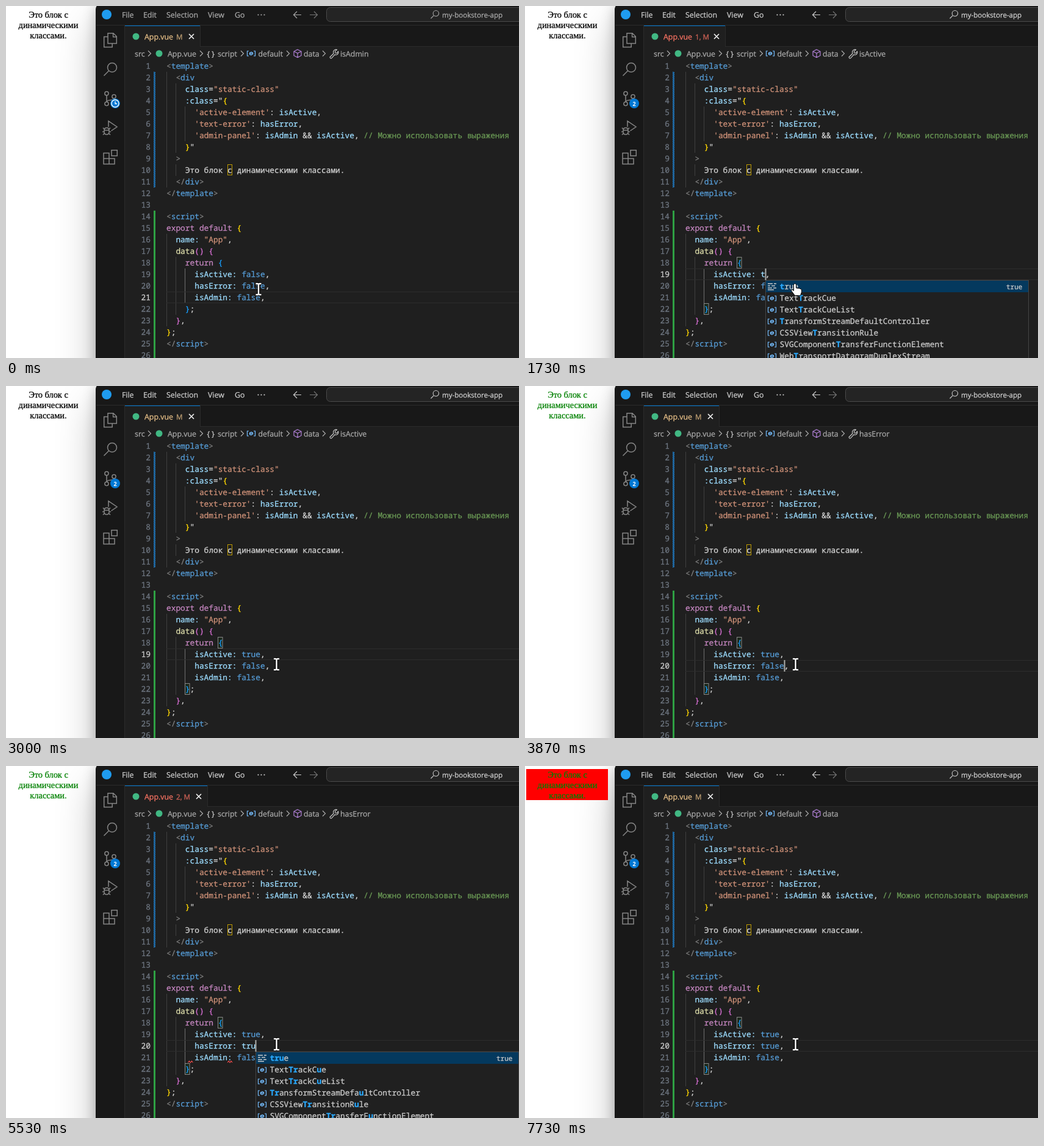
Recreate the animation shown at these times as an HTML page. Size 841 by 578 pixels, loop 8000 ms.

```html
<!DOCTYPE html>
<html lang="ru">
<head>
<meta charset="utf-8">
<title>Dynamic classes</title>
<style>
html, body { margin: 0; width: 100%; height: 100%; overflow: hidden; background: #fff; }
#scene { position: relative; width: 100%; height: 100%; overflow: clip; contain: strict; }
#window {
  position: absolute; left: 147px; right: -20px; top: -3px; bottom: -40px;
  background: #181818; border-radius: 8px 0 0 0;
  box-shadow: 0 32px 64px rgba(0, 0, 0, .26), 0 2px 21px rgba(0, 0, 0, .24);
}
svg { display: block; position: absolute; left: 0; top: 0; }
text {
  white-space: pre; text-rendering: geometricPrecision;
  fill: currentColor; stroke: currentColor; stroke-width: .28px;
}
.ui { font-family: "Open Sans", "Noto Sans", sans-serif; font-size: 12.35px; }
.mono { font-family: "Noto Sans Mono", "DejaVu Sans Mono", monospace; font-size: 12.83px; }
.page { font-family: "Liberation Serif", serif; font-size: 14.4px; text-anchor: middle; }
</style>
</head>
<body>
<div id="scene">
  <div id="window"></div>
  <svg id="stage" width="841" height="578" viewBox="0 0 841 578"></svg>
</div>
<script>
const LOOP = 8000, LEFT = 263, CHAR = 7.698, ROW = 19;
const colX = col => LEFT + col * CHAR;
const rowY = line => 89 + (line - 1) * ROW;

const COLORS = {
  g: '#808080', b: '#569cd6', a: '#9cdcfe', s: '#ce9178', w: '#d4d4d4', c: '#6a9955',
  k: '#c586c0', f: '#dcdcaa', y: '#ffd700', p: '#da70d6', u: '#179fff'
};

// Each line: indent, then "~"-separated runs that start with a colour key.
const codeLines = s => [
  [0, 'g<~btemplate~g>'],
  [2, 'g<~bdiv'],
  [4, 'aclass~w=~s"static-class"'],
  [4, 'a:class~w="~y{'],
  [6, "s'active-element'~w: ~aisActive~w,"],
  [6, "s'text-error'~w: ~ahasError~w,"],
  [6, "s'admin-panel'~w: ~aisAdmin~w && ~aisActive~w, ~c// Можно использовать выражения"],
  [4, 'y}~w"'],
  [2, 'g>'],
  [4, 'wЭто блок с динамическими классами.'],
  [2, 'g</~bdiv~g>'],
  [0, 'g</~btemplate~g>'],
  [0, 'w'],
  [0, 'g<~bscript~g>'],
  [0, 'kexport default ~y{'],
  [2, 'aname: ~s"App"~w,'],
  [2, 'fdata~p() {'],
  [4, 'kreturn ~u{'],
  [6, 'aisActive: ' + valueRun(s.active + ',')],
  [6, 'ahasError: ' + valueRun(s.error)],
  [6, 'aisAdmin: ' + valueRun('false,')],
  [4, 'u}~w;'],
  [2, 'p}~w,'],
  [0, 'y}~w;'],
  [0, 'g</~bscript~g>'],
  [0, 'w']
];

function valueRun(value) {
  const word = value.replace(',', '');
  const key = word === 'true' || word === 'false' ? 'b' : 'a';
  return `~${key}${word}~w${value.slice(word.length)}`;
}

// Column, first line, last line; the last guide is the active one.
const GUIDES = [[0, 2, 11], [2, 3, 8], [2, 10, 10], [4, 5, 7], [0, 16, 23], [2, 18, 22], [4, 19, 21]];
const SUGGESTIONS = [
  'true', 'TextTrackCue', 'TextTrackCueList', 'TransformStreamDefaultController',
  'CSSViewTransitionRule', 'SVGComponentTransferFunctionElement', 'WebTransportDatagramDuplexStream'
];

// Every step lists only what changes at that time.
const STEPS = [
  [0, { clock: true, focus: false, line: 21, col: 0, caret: false, mouse: [414, 465], active: 'false',
        error: 'false,', crumb: 'isAdmin', errors: 0, selected: false, bulb: false, popup: false,
        waves: [], ink: '#000', alarm: false }],
  [70, { mouse: [414, 461] }],
  [130, { clock: false, mouse: [413, 453] }],
  [200, { mouse: [412, 447] }],
  [270, { mouse: [412, 444] }],
  [530, { focus: true, line: 19, col: 19, caret: true }],
  [600, { selected: true, col: 21 }],
  [670, { crumb: 'isActive', mouse: [422, 448] }],
  [730, { mouse: [436, 455] }],
  [870, { mouse: [443.5, 457], bulb: true }],
  [1130, { caret: false }],
  [1530, { selected: false, bulb: false, active: 't', col: 17, caret: true }],
  [1600, { popup: true }],
  [1670, { errors: 1 }],
  [1930, { active: 'tr', col: 18 }],
  [2000, { active: 'tru', col: 19 }],
  [2070, { active: 'true', col: 20 }],
  [2130, { errors: 0 }],
  [2470, { popup: false }],
  [3000, { caret: false }],
  [3270, { ink: '#008000' }],
  [3530, { caret: true }],
  [3670, { line: 20 }],
  [3730, { col: 21 }],
  [3870, { crumb: 'hasError' }],
  [4070, { error: 'false' }],
  [4200, { crumb: '' }],
  [4330, { errors: 1, waves: [[6, 13]] }],
  [4730, { crumb: 'hasError' }],
  [4870, { error: 'fals', col: 20 }],
  [4930, { error: 'fal', col: 19 }],
  [5000, { error: 'fa', col: 18 }],
  [5070, { error: 'f', col: 17 }],
  [5130, { error: '', col: 16, clock: true }],
  [5200, { error: 't', col: 17, errors: 2, waves: [[4.6, 5.5], [13, 14], [20, 21]] }],
  [5330, { error: 'tr', col: 18, popup: true }],
  [5470, { error: 'tru', col: 19, clock: false }],
  [5600, { error: 'true', col: 20 }],
  [6000, { popup: false }],
  [6270, { errors: 1, waves: [[6, 13]] }],
  [6330, { error: 'true,', col: 21 }],
  [6600, { errors: 0, waves: [] }],
  [6670, { crumb: '' }],
  [6730, { caret: false }],
  [7270, { caret: true }],
  [7530, { alarm: true }],
  [7730, { caret: false }]
];
const states = STEPS.map((_, i) => Object.assign({}, ...STEPS.slice(0, i + 1).map(step => step[1])));

const esc = str => str.replace(/&/g, '&amp;').replace(/</g, '&lt;');
const text = (x, y, str, color, cls = 'ui', extra = '') =>
  `<text class="${cls}" x="${x}" y="${y}" color="${color}" ${extra}>${esc(str)}</text>`;
const rect = (x, y, w, h, fill, extra = '') =>
  `<rect x="${x}" y="${y}" width="${w}" height="${h}" fill="${fill}" ${extra}/>`;
const line = (d, stroke, width = 1) =>
  `<path d="${d}" fill="none" stroke="${stroke}" stroke-width="${width}"/>`;
const dot = (x, y, r, fill, extra = '') => `<circle cx="${x}" cy="${y}" r="${r}" fill="${fill}" ${extra}/>`;
const at = (x, y, content) => `<g transform="translate(${x} ${y})">${content}</g>`;

const lens = (x, y, k, color, width) => at(x, y,
  dot(3 * k, -3 * k, 7.5 * k, 'none', `stroke="${color}" stroke-width="${width}"`) +
  line(`M${-2.3 * k} ${2.3 * k}L${-10.5 * k} ${10.5 * k}`, color, width));
const variableIcon = (x, y) => at(x, y,
  line('M-4-4h-2.5v8h2.5M4-4h2.5v8h-2.5M-2.6 1.4v-2.2l2.8-1.6 2.4 1.2v2.2l-2.8 1.6zM-2.4-.6l2.4 1 2.4-1.4', '#75beff', 1.2));

function page(s) {
  const rows = ['Это блок с', 'динамическими', 'классами.'];
  return (s.alarm ? rect(2, 5, 134, 51, '#f00') : '') +
    rows.map((row, i) => text(69.5, 19 + 17 * i, row, s.ink, 'page')).join('');
}

function titleBar(s) {
  const color = s.focus ? '#cccccc' : '#a8a8a8';
  const menu = [[190, 'File'], [225, 'Edit'], [263, 'Selection'], [331, 'View'], [375, 'Go']];
  return dot(165, 14, 8, '#1f9cf0') +
    menu.map(([x, name]) => text(x, 19, name, color)).join('') +
    [413.5, 418.5, 423.5].map(x => dot(x, 14.5, 1.1, color)).join('') +
    line('M484 14.5h-12.5M477 9l-5.5 5.5 5.5 5.5', color, 1.2) +
    line('M498 14.5h12M505 9l5.5 5.5-5.5 5.5', '#777', 1.2) +
    rect(525.5, 2.5, 400, 23, '#242424', 'rx="6" stroke="#4a4a4a"') +
    lens(703, 14, .62, color, 1.1) +
    text(715, 19, 'my-bookstore-app', color, 'ui', 'style="font-size:11.55px"') +
    rect(148, 31, 693, 1, '#2b2b2b');
}

function activityBar(s) {
  const ink = '#868686', pen = d => line(d, ink, 1.5);
  const badge = s.clock
    ? dot(0, 0, 8, '#0078d4') + dot(0, 0, 6, 'none', 'stroke="#fff" stroke-width="1.4"') + line('M0-3.5v4h3', '#fff', 1.3)
    : dot(0, 0, 8, '#0078d4') + text(0, 3.5, '2', '#fff', 'ui', 'text-anchor="middle" style="font-size:9px;font-weight:600"');
  return rect(194, 32, 1, 546, '#2b2b2b') +
    at(171, 56, pen('M-4-11.3h9l5.3 5.3v11.5h-14.3zM4.6-11.3v6h5.7M-4-5.5h-6.3v17h13.5v-6')) +
    lens(171, 104, 1, ink, 1.5) +
    at(171, 152, pen('M-6-5v10M6 0c0 4-12 1-12 5.5') +
      [[-6, -8.3], [6, -3.3], [-6, 8.6]].map(([x, y]) => dot(x, y, 3.1, '#181818', `stroke="${ink}" stroke-width="1.5"`)).join('')) +
    at(179, 160, badge) +
    at(171, 200, pen('M-3-1.5v-9.5l14 9.5-9.5 6.5M-10 4.5q0-4.5 4-4.5t4 4.5v2q0 4.5-4 4.5t-4-4.5zM-10 4h8M-10 2l-2-2M-2 2l2-2M-10 6.5h-3M-2 6.5h3M-9.5 9l-2.5 2.5M-2.5 9l2.5 2.5')) +
    at(171, 248, pen('M-11-6.5h9v9h-9zM-11 2.5h9v9h-9zM-2 2.5h9v9h-9zM2-11.3h9.3v9.3h-9.3z'));
}

function tab(s) {
  const grow = [0, 10, 12][s.errors], right = 318 + grow, color = s.errors ? '#f97363' : '#e8c088';
  return rect(195, 32, 646, 546, '#1f1f1f') +
    rect(right, 32, 841 - right, 35, '#181818') +
    rect(right, 32, 1, 35, '#2b2b2b') + rect(right, 66, 841 - right, 1, '#2b2b2b') +
    rect(195, 32, right - 195, 1, '#0078d4') +
    dot(213, 50, 5.5, '#41b883') +
    text(227, 55, 'App.vue', color) +
    text(279, 54.5, s.errors ? s.errors + ', M' : 'M', color, 'ui', 'opacity=".8" style="font-size:11.6px"') +
    line(`M${300 + grow} 46l8 8m0-8l-8 8`, '#fff', 1.5);
}

function breadcrumbs(s) {
  const ink = '#a9a9a9';
  const names = [[211, 'src'], [265, 'App.vue'], [347, 'script'], [413.5, 'default'], [488, 'data']];
  const chevrons = [233, 318, 385, 460];
  let out = '';
  if (s.crumb) {
    names.push([548, s.crumb]);
    chevrons.push(519);
    out += line('M531 84l6-6q-1.5-4 2-6 2-1 3.5-.3l-3 3 .3 2.3 2.3.3 2.5-2.8q1 3-1.5 5-2 1.3-4 .3l-5.5 6q-2 .8-2.6-1.8z', '#ccc', 1.1);
  }
  return out + names.map(([x, name]) => text(x, 83, name, ink)).join('') +
    chevrons.map(x => line(`M${x} 73.5l4.5 4.5-4.5 4.5`, ink, 1.2)).join('') +
    dot(251, 78, 5.5, '#41b883') +
    text(329.5, 82.5, '{ }', '#ccc', 'ui', 'style="font-size:12px"') +
    variableIcon(402, 78) +
    line('M478 71.5l6 3v7l-6 3-6-3v-7zM472 74.5l6 3 6-3M478 77.5v7', '#b180d7', 1.2);
}

function gutter(s) {
  let out = rect(242, rowY(2), 3, 190, 'url(#hatch)') + rect(242, rowY(14), 3, 250, '#2ea043');
  for (let n = 1; n <= 26; n++)
    out += text(237, rowY(n) + 14, String(n), n === s.line ? '#cccccc' : '#6e7681', 'mono', 'text-anchor="end"');
  return out;
}

function decorations(s) {
  let out = GUIDES.map(([col, from, to], i) =>
    rect(Math.floor(colX(col)), rowY(from), 1, (to - from + 1) * ROW, i === 6 ? '#707070' : '#404040')).join('');
  if (s.selected) {
    out += [[16, 19], [16, 20], [15, 21]].map(([col, n], i) =>
      rect(colX(col), rowY(n), 5 * CHAR, ROW, i ? '#343a40' : '#264f78', 'rx="2"')).join('');
  } else {
    out += rect(LEFT, rowY(s.line), 578, 1, '#2d2d2d') + rect(LEFT, rowY(s.line) + 18, 578, 1, '#2d2d2d');
    if (s.focus) out += [[11, 18], [4, 22]].map(([col, n]) =>
      rect(Math.floor(colX(col)) + .5, rowY(n) + .5, 7.5, 18, '#1c281c', 'stroke="#888"')).join('');
  }
  out += rect(363.5, rowY(10) + .5, 7, 17, 'none', 'stroke="#bd9b03"');
  if (s.bulb) out += dot(271.5, 437, 4.8, '#ffcc00') + rect(269, 440, 5, 5, '#ffcc00', 'rx="1"') + rect(269, 442, 5, 1, '#1f1f1f');
  return out;
}

function code(s) {
  return codeLines(s).map(([indent, runs], i) => {
    const spans = runs.split('~').map(run => `<tspan color="${COLORS[run[0]]}">${esc(run.slice(1))}</tspan>`).join('');
    return `<text class="mono" x="${colX(indent)}" y="${rowY(i + 1) + 14}">${spans}</text>`;
  }).join('');
}

function waves(s) {
  return s.waves.map(([from, to]) => {
    const count = Math.round((to - from) * CHAR / 4);
    return line(`M${colX(from)} 487` + 'l2-2.5l2 2.5'.repeat(count), '#f14c4c', 1.1);
  }).join('');
}

// Marks the typed letters in a suggestion.
function matched(name, typed) {
  const start = Math.max(0, name.indexOf('Tr'));
  let k = 0;
  return [...name].map((ch, i) => {
    if (i < start || ch.toLowerCase() !== typed[k]) return ch;
    k++;
    return `<tspan color="#2aaaff" font-weight="700">${ch}</tspan>`;
  }).join('');
}

function popup(s) {
  if (!s.popup) return '';
  const x = Math.round(colX(s.col)), top = rowY(s.line + 1) + 1;
  const typed = s.line === 19 ? s.active : s.error;
  let out = rect(x + .5, top - .5, 431, 240, '#202020', 'stroke="#454545"') + rect(x + 1, top, 430, ROW, '#04395e');
  SUGGESTIONS.forEach((name, i) => {
    const y = top + i * ROW;
    out += i ? variableIcon(x + 11, y + 10)
      : line(`M${x + 4} ${y + 5}h8m2 0h4M${x + 4} ${y + 8.5}h4m2 0h6M${x + 4} ${y + 12}h7m2 0h5M${x + 4} ${y + 15}h10`, '#ccc', 1.4);
    out += `<text class="mono" x="${x + 23.5}" y="${y + 14}" color="#cccccc">${matched(name, typed)}</text>`;
  });
  return out + text(x + 395, top + 13.5, 'true', '#cccccc', 'mono', 'style="font-size:11px"');
}

function pointer(s) {
  const [x, y] = s.mouse;
  if (s.popup && s.line === 19)
    return at(x - 1, y - 1, '<path d="M-2 1q2-2.5 4 0v6q6.5 .2 9 2.5v4l-2 6h-9l-6-8q0-2.5 2-1.5l2 1.5z" fill="#fff" stroke="#000"/>');
  const beam = 'M-4.5-9h3l1.5 1 1.5-1h3M0-8v16M-4.5 9h3l1.5-1 1.5 1h3';
  return at(x, y, line(beam, '#000', 4.5) + line(beam, '#fff', 2.4));
}

const HATCH = `<defs><pattern id="hatch" width="3" height="3" patternUnits="userSpaceOnUse">
  <path d="M-1 1l2-2M0 3l3-3M2 4l2-2" stroke="#1f8ae0" stroke-width="1.3"/></pattern></defs>`;

function draw(s) {
  const caret = s.caret ? rect(Math.round(colX(s.col)) - .5, rowY(s.line), 2, ROW, '#aeafad') : '';
  return HATCH + page(s) + titleBar(s) + activityBar(s) + tab(s) + breadcrumbs(s) + gutter(s) +
    decorations(s) + code(s) + waves(s) + caret + popup(s) + pointer(s);
}

const stage = document.getElementById('stage');
let shown = -1;
function tick() {
  const now = performance.now() % LOOP;
  const index = STEPS.findLastIndex(([time]) => time <= now);
  if (index !== shown) stage.innerHTML = draw(states[shown = index]);
  requestAnimationFrame(tick);
}
tick();
</script>
</body>
</html>
```
